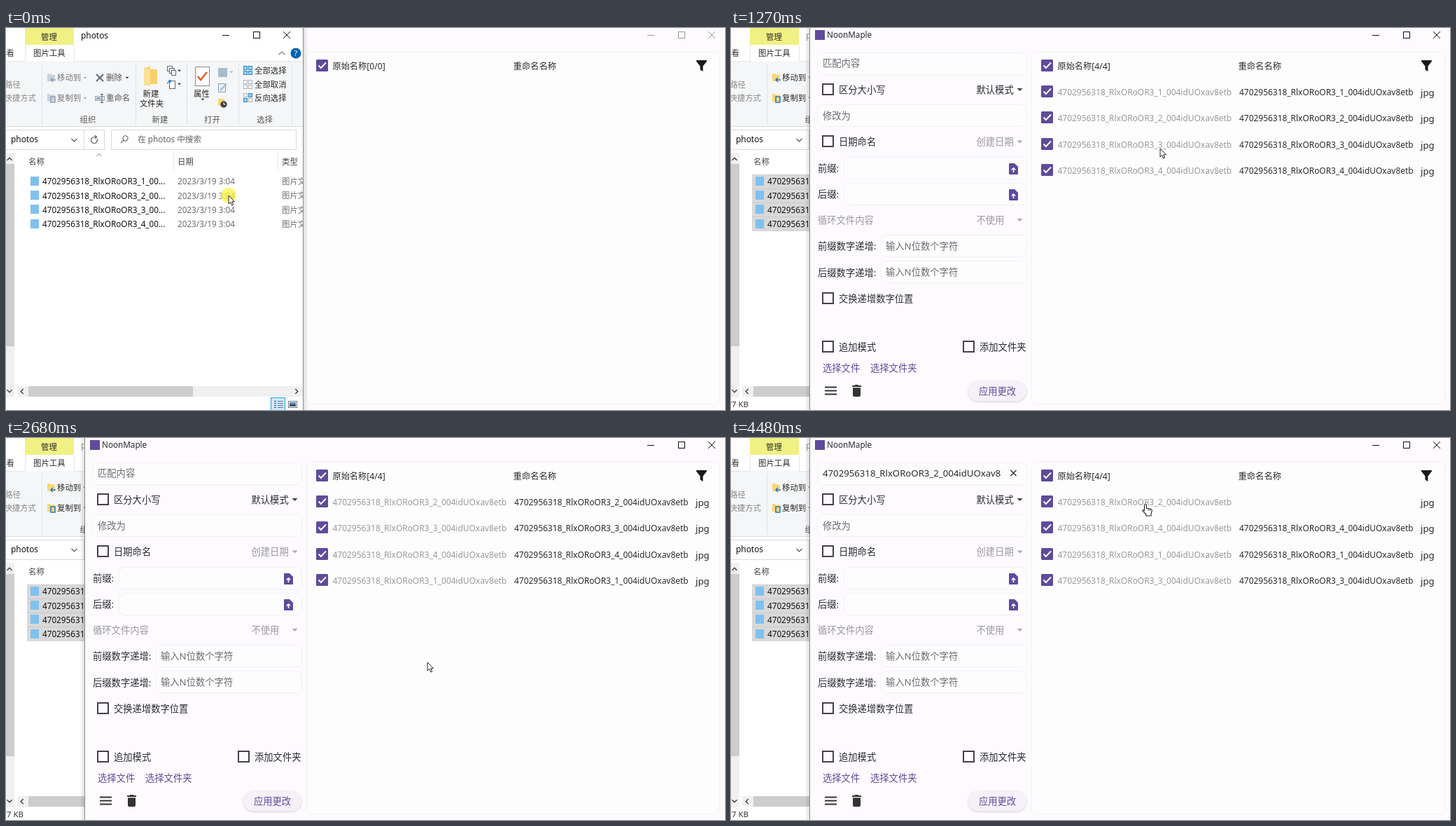
An HTML page with a canvas that plays this animation: 1027x545 px, repeating every 5.22 s.

```html
<!DOCTYPE html>
<html lang="zh-CN">
<head>
<meta charset="utf-8">
<title>Batch rename</title>
<style>
html, body { margin: 0; width: 100%; height: 100%; overflow: hidden; background: #fff; }
canvas { display: block; }
</style>
</head>
<body>
<canvas id="stage" width="1027" height="545"></canvas>
<script>
const ctx = document.getElementById('stage').getContext('2d');
const LOOP = 5220, STEP = 66.92;
const FONT = '"Noto Sans", "Noto Sans CJK SC", sans-serif';
const PURPLE = '#5f4b9b', INK = '#2a292d', EXPLORER_W = 424, APP_X = 112;
const fileName = n => `4702956318_RlxORoOR3_${n}_004idUOxav8etb`;

// ---- drawing helpers ----
function text(str, x, y, size = 11.4, color = '#2a2a2a', align = 'left') {
  ctx.font = `${size}px ${FONT}`;
  ctx.fillStyle = color;
  ctx.textAlign = align;
  ctx.fillText(str, x, Math.round(y + size * 0.37));
}
function rect(x, y, w, h, fill, stroke) {
  if (fill) { ctx.fillStyle = fill; ctx.fillRect(x, y, w, h); }
  if (stroke) { ctx.strokeStyle = stroke; ctx.lineWidth = 1; ctx.strokeRect(x + .5, y + .5, w - 1, h - 1); }
}
function round(x, y, w, h, r, fill, stroke) {
  ctx.beginPath();
  ctx.roundRect(x, y, w, h, r);
  if (fill) { ctx.fillStyle = fill; ctx.fill(); }
  if (stroke) { ctx.strokeStyle = stroke; ctx.lineWidth = 1; ctx.stroke(); }
}
function circle(x, y, r, fill) {
  ctx.beginPath();
  ctx.arc(x, y, r, 0, 7);
  ctx.fillStyle = fill;
  ctx.fill();
}
function path(d, x, y, fill, stroke, width = 1) {
  const p = new Path2D(d);
  ctx.save();
  ctx.translate(x, y);
  if (fill) { ctx.fillStyle = fill; ctx.fill(p); }
  if (stroke) { ctx.strokeStyle = stroke; ctx.lineWidth = width; ctx.stroke(p); }
  ctx.restore();
}
const dropArrow = (x, y, color = '#333', s = 2.5) => path(`M${-s} ${-s / 2}H${s}L0 ${s / 2}Z`, x, y, color);
function chevron(x, y, s, dir, color, width = 1.2) {
  const h = 'v>'.includes(dir) ? s / 2 : -s / 2;
  const d = 'v^'.includes(dir) ? `M${-s} ${-h}L0 ${h}L${s} ${-h}` : `M${-h} ${-s}L${h} 0L${-h} ${s}`;
  path(d, x, y, null, color, width);
}
function windowButtons(x, gap, color) {
  path('M-5 .5H5', x, 10, null, color);
  rect(Math.round(x + gap - 5), 5, 10, 10, null, color);
  path('M-5-5L5 5M5-5L-5 5', x + 2 * gap, 10, null, color);
}

// ---- timing ----
const clamp = v => Math.max(0, Math.min(1, v));
const smooth = v => { v = clamp(v); return v * v * (3 - 2 * v); };
const easeOut = v => 1 - (1 - clamp(v)) ** 3;
const mix = (a, b, k) => a + (b - a) * k;
const within = (t, a, b) => t >= a && t < b;

// Pointer tip: time, x, y
const POINTER = [
  [0, 318, 239], [540, 330, 240], [800, 627, 204], [1070, 627, 204], [1600, 591, 121],
  [1800, 590, 114], [1930, 590, 99], [2020, 590, 102], [2075, 590, 130], [2140, 590, 224],
  [2275, 590, 332], [2370, 591, 356], [2440, 592, 354], [2670, 602, 324], [3010, 610, 141],
  [3110, 610, 142], [3210, 610, 215], [3280, 610, 243], [3560, 610, 242], [3950, 591, 94]
];
function pointer(t) {
  const i = POINTER.findIndex(p => p[0] > t);
  if (i < 0) return POINTER.at(-1).slice(1);
  const [a, b] = [POINTER[i - 1], POINTER[i]], k = (t - a[0]) / (b[0] - a[0]);
  return [mix(a[1], b[1], k), mix(a[2], b[2], k)];
}
const pressed = t => t < 140 || within(t, 460, 1060) || within(t, 1990, 2400) ||
  within(t, 3060, 3300) || within(t, 4080, 4280);

const PITCH = 37.3;
const slot = i => 91 + PITCH * i;
const settle = (t, start) => smooth((t - start) / 250);
function dragged(t, from, to, offset, grab, drop) {
  if (t < grab) return slot(from);
  const y = Math.max(slot(from), pointer(Math.min(t, drop))[1] - offset);
  return t < drop ? y : mix(y, slot(to), easeOut((t - drop) / 200));
}
function rowY(n, t) {
  switch (n) {
    case 1: return dragged(t, 0, 3, 8, 1990, 2400) - PITCH * settle(t, 3214);
    case 2: return slot(1) - PITCH * settle(t, 2060);
    case 3: return t < 3060 ? slot(2) - PITCH * settle(t, 2095) : dragged(t, 1, 3, 12, 3060, 3300);
    default: return slot(3) - PITCH * (settle(t, 2131) + settle(t, 3181));
  }
}

// ---- file manager ----
function folder(x, y, mark, on) {
  path('M0 1H4L5 2.5H11V12H0Z', x, y, on ? '#f8d775' : '#c9d3dc');
  path(mark, x, y, null, on ? '#2878c8' : '#8fa4b8', 1.6);
}
function ribbon(on) {
  const label = on ? '#2a2a2a' : '#777', arrow = on ? '#333' : '#aaa';
  rect(0, 48, EXPLORER_W, 93, '#f5f6f7');
  rect(0, 47, EXPLORER_W, 1, '#e4e5e6');
  rect(0, 140, EXPLORER_W, 1, '#dadbdc');
  rect(27, 0, 70, 24, '#f0f083');
  rect(27, 24, 1, 24, '#e8e8e0');
  rect(97, 24, 1, 24, '#e8e8e0');
  rect(28, 47, 69, 1, '#f9f9f9');
  text('管理', 50, 13);
  text('图片工具', 39, 36);
  text('查看', 12, 36, 11.4, '#333', 'right');
  chevron(394, 36, 4.5, '^', '#888');
  circle(414, 36, 7.5, '#0063b1');
  text('?', 414, 36, 11, '#fff', 'center');
  text('复制路径', 21, 81, 11.4, '#888', 'right');
  text('粘贴快捷方式', 43, 100, 11.4, '#888', 'right');
  for (const x of [51, 185, 258, 332, 408]) rect(x, 51, 1, 87, '#e2e3e4');
  ['组织', '新建', '打开', '选择'].forEach((s, i) => text(s, [117, 220, 294.5, 369.5][i], 131, 11.4, '#555', 'center'));

  folder(59, 64, 'M12 10H6M8 7L5 10L8 13', on);
  folder(59, 93, 'M5 5H11V13H5Z', on);
  text('移动到', 73, 71, 11.4, label);
  text('复制到', 73, 100, 11.4, label);
  dropArrow(113, 71, arrow);
  dropArrow(113, 100, arrow);
  path('M-5-5L5 5M5-5L-5 5', 134, 71, null, on ? '#d32a12' : '#5c6c80', 2);
  text('删除', 143, 71, 11.4, on ? '#222' : '#555');
  dropArrow(173, 71);
  rect(127, 97, 14, 7, on ? '#dcecfa' : '#e6eaee', on ? '#3b87c9' : '#94a5b5');
  rect(129, 99, 6, 3, on ? '#2878c8' : '#94a5b5');
  path('M-2-6H2M-2 6H2M0-6V6', 137, 100.5, null, '#555');
  text('重命名', 143, 100, 11.4, on ? '#222' : '#555');

  path('M0 2L9 0V4H19V25H9L0 27Z', 197, 55, '#f6d169');
  path('M0 2L9 4V28L0 26Z', 197, 55, '#fae195');
  text('新建', 207, 94, 11.4, '#222', 'center');
  text('文件夹', 208, 108, 11.4, '#222', 'center');
  rect(230, 54, 8, 8, '#fff', '#667');
  rect(233, 57, 8, 8, '#e7eef5', '#667');
  rect(236, 60, 7, 8, '#fff', '#667');
  dropArrow(247.5, 61);
  rect(233, 75, 9, 12, '#fff', '#667');
  path('M0 4L5 0M2 0H5V3', 230, 75, null, '#2878c8', 1.3);
  dropArrow(247.5, 80);

  rect(270, 55, 21, 28, '#fff', '#8b8b8b');
  path('M0 5L4 10L13-1', 274, 64, null, '#d9622b', 2.6);
  text('属性', 279.5, 94, 11.4, '#222', 'center');
  dropArrow(281, 102);
  rect(303, 57, 13, 13, on ? '#2a8fd6' : '#a9bccb');
  dropArrow(322, 63, arrow);
  rect(303, 79, 11, 13, on ? '#fff' : '#e9eff6', '#8ba0b8');
  path('M0 9L9 0', 306, 80, null, on ? '#e0a32c' : '#a3b8cf', 2.2);
  rect(303, 101, 9, 10, on ? '#dbe5ef' : '#f8d775');
  circle(311, 109, 4.7, on ? '#9cb8d4' : '#444');
  path('M0-3V0H2.5', 311, 109, null, '#fff');

  ['全部选择', '全部取消', '反向选择'].forEach((s, i) => {
    const y = 61 + i * 19.5;
    text(s, 355, y);
    for (let k = 0; k < 4; k++) {
      const full = i === 0 || (i === 2 && (k === 1 || k === 2));
      rect(339 + (k % 2) * 7, Math.round(y) - 7 + (k >> 1) * 7, 6, 6, full ? '#9bd0f2' : '#fff', full ? '#2d86c4' : '#aab2ba');
    }
  });
}
function explorer(t, front) {
  const picked = t >= 70, all = t >= 190;
  ctx.save();
  ctx.beginPath();
  ctx.rect(0, 0, EXPLORER_W, 545);
  ctx.clip();
  rect(0, 0, EXPLORER_W, 545, '#fff');
  ribbon(picked);
  text('photos', 107, 11, 11.9, front ? '#111' : '#999');
  windowButtons(314, 43.5, '#111');

  rect(-1, 145, 113, 29, '#fff', '#d9d9d9');
  rect(111, 145, 30, 29, '#fff', '#d9d9d9');
  rect(150, 145, 265, 29, '#fff', '#d9d9d9');
  text('photos', 7, 159, 11.9, '#111');
  chevron(97.5, 160, 4, 'v', '#555');
  path('M4-2A4.5 4.5 0 1 1 0-4.5H3M1-7L3.5-4.5L1-2', 126, 160, null, '#555', 1.2);
  path('M-1 1L-5 5M-1 1A3.6 3.6 0 1 1 4 1A3.6 3.6 0 0 1-1 1', 169, 159, null, '#666', 1.1);
  text('在 photos 中搜索', 188, 159, 11.7, '#666');

  text('名称', 32, 191, 11.4, '#444');
  text('日期', 245, 191, 11.4, '#444');
  text('类型', 394, 191, 11.4, '#444');
  chevron(133, 181, 3.5, '^', '#777', 1);
  rect(239, 178, 1, 25, '#e5e5e5');
  rect(388, 178, 1, 25, '#e5e5e5');
  for (let i = 0; i < 4; i++) {
    const y = 219 + i * 20.2, top = Math.round(y - 10.5);
    if (all || (picked && i === 1)) {
      rect(30, top, 400, 21, front ? '#cce8ff' : '#d9d9d9');
      rect(30, top, 400, 1, front ? '#a9d7fb' : '#cbcbcb');
    }
    rect(35, Math.round(y) - 7, 12, 13, '#7fc1ee');
    text(fileName(i + 1).slice(0, 25) + '...', 52, y, 11.73, '#111');
    text('2023/3/19 3:04', 245, y, 11.73, '#6d6d6d');
    text('图片文件', 394, y, 11.4, '#6d6d6d');
  }

  rect(0, 178, 12, 349, '#f0f0f0');
  rect(0, 194, 12, 260, '#cdcdcd');
  chevron(5, 187, 3.5, '^', '#444', 1.5);
  chevron(5, 518, 3.5, 'v', '#444', 1.5);
  rect(16, 511, 408, 15, '#f0f0f0');
  rect(32, 511, 235, 15, '#cdcdcd');
  chevron(23, 518.5, 3.5, '<', '#444', 1.5);
  chevron(415, 518.5, 3.5, '>', '#444', 1.5);
  if (all) text(t < 600 ? '7 KB' : '77 KB', 25, 537, 11.4, '#333', 'right');
  rect(378, 527, 21, 20, '#cce8ff', '#26a0da');
  for (let y = 532; y < 544; y += 3) { rect(383, y, 3, 1, '#456'); rect(388, y, 8, 1, '#678'); }
  rect(403, 532, 13, 10, '#fff', '#777');
  rect(405, 534, 9, 4, '#4a90c4');
  rect(405, 537, 9, 3, '#456');
  ctx.restore();
}

// ---- rename tool ----
const field = (x, y, w) => round(x + .5, y + .5, w, 31, 8, '#fefdfe', '#f4f0f6');
function checkbox(x, y, checked) {
  if (checked) {
    round(x - 8.5, y - 8.5, 17, 17, 1.5, PURPLE);
    path('M-5 0L-1.7 3.5L5.5-4', x, y, null, '#fff', 1.9);
  } else {
    ctx.strokeStyle = '#45414b';
    ctx.lineWidth = 2;
    ctx.strokeRect(x - 7.5, y - 7.5, 15, 15);
  }
}
function option(x, y, label) {
  checkbox(x, y, false);
  text(label, x + 15.5, y + .8, 13.3, INK);
}
function uploadIcon(x, y) {
  path('M0 1Q0 0 1 0H8L13 5V15Q13 16 12 16H1Q0 16 0 15Z', x, y, PURPLE);
  path('M6.5 13V8M3.8 9.5L6.5 6.8L9.2 9.5', x, y, null, '#fff', 1.6);
}
function settings(t) {
  const hint = '#6c6870', faint = '#9b979e';
  rect(120, 3, 14, 14, PURPLE);
  text('NoonMaple', 137, 10, 11.7, INK);
  field(123, 35, 299);
  if (t >= 4280) {
    text(fileName(2).slice(0, 34), 131, 50, 13.2, INK);
    path('M-4-4L4 4M4-4L-4 4', 403.5, 50, null, '#333', 1.5);
  } else text('匹配内容', 131, 50, 13.3, hint);
  option(138.5, 87.5, '区分大小写');
  text('默认模式', 350.5, 88, 13.3, INK);
  dropArrow(412.5, 88, '#444', 4);
  field(123, 109, 299);
  text('修改为', 131, 125, 13.3, hint);
  option(138.5, 161.5, '日期命名');
  text('创建日期', 350.5, 162.5, 13.3, faint);
  dropArrow(412.5, 162.5, '#aaa', 4);
  ['前缀:', '后缀:'].forEach((s, i) => {
    const y = 200 + PITCH * i;
    text(s, 124, y, 13.3, INK);
    field(161, Math.round(y) - 16, 261);
    uploadIcon(397, Math.round(y) - 7);
  });
  text('循环文件内容', 124, 274.5, 13.3, faint);
  text('不使用', 350.5, 274.5, 13.3, faint);
  dropArrow(412.5, 274, '#aaa', 4);
  ['前缀数字递增:', '后缀数字递增:'].forEach((s, i) => {
    const y = 311.5 + PITCH * i;
    text(s, 124, y, 13.3, INK);
    field(214, Math.round(y) - 17, 208);
    text('输入N位数个字符', 221, y - .5, 13.3, hint);
  });
  option(138.5, 385.5, '交换递增数字位置');
  option(138.5, 454.5, '追加模式');
  option(339.5, 454.5, '添加文件夹');
  text('选择文件', 131, 485, 13.3, PURPLE);
  text('选择文件夹', 199, 485, 13.3, PURPLE);
  path('M0 0H17M0 5H17M0 10H17', 134, 512.5, null, '#333', 1.8);
  path('M0 1H3.5L4.5 0H8.5L9.5 1H13V3H0ZM1 4.2H12V15Q12 17 10 17H3Q1 17 1 15Z', 173, 509, '#333');
  ctx.save();
  ctx.shadowColor = 'rgba(0,0,0,.18)';
  ctx.shadowBlur = 3;
  ctx.shadowOffsetY = 1;
  round(339, 503.5, 83, 29, 14.5, '#f6f1f9');
  ctx.restore();
  text('应用更改', 380.5, 518.5, 13.3, PURPLE, 'center');
}
function fileRow(n, t) {
  const y = Math.round(rowY(n, t));
  const held = n === 1 ? within(t, 1990, 2600) : n === 3 && within(t, 3060, 3500);
  if (held) {
    rect(429, y - 18, 591, 37, '#fdfbfe');
    if (pressed(t)) rect(429, y + 18, 591, 1, '#dedbe1');
  }
  checkbox(451.5, y - .5, true);
  text(fileName(n), 466.5, y + 1, 11.95, '#9a989c');
  if (n !== 2 || t < 4280) text(fileName(n), 726, y + 1, 11.95, INK);
  text('jpg', 985, y + 1, 13.3, INK);
}
function app(t, front) {
  const loaded = t >= 1000;
  rect(APP_X, 0, 1027 - APP_X, 545, '#fdfbfe');
  windowButtons(921, 43.5, front ? '#111' : '#999');
  settings(t);
  round(429.5, 34.5, 590, 502, 8, '#fefdfe', '#f4f1f6');
  checkbox(451.5, 53.5, true);
  text(`原始名称[${loaded ? '4/4' : '0/0'}]`, 466.5, 54.5, 12.2, INK);
  text('重命名名称', 724.5, 54, 12.3, INK);
  path('M0 0H15V1.5L9.5 8.5V16L5.5 13.5V8.5L0 1.5Z', 986, 46, '#1a1a1a');
  if (loaded) {
    const order = t < 2800 ? [2, 3, 4, 1] : [2, 4, 1, 3];
    order.forEach(n => fileRow(n, t));
  }
}

// Soft shadow beside a window edge; dir is the side it falls on
function edgeShadow(x, dir) {
  rect(x, 0, 1, 545, '#8f8f8f');
  for (let i = 1; i < 7; i++) rect(x + dir * i, 0, 1, 545, `rgba(0,0,0,${0.13 * (1 - i / 7)})`);
}

function drawPointer(t) {
  const [x, y] = pointer(t).map(Math.round);
  if (pressed(t)) circle(x, y, 11, 'rgba(255,244,60,.72)');
  const hand = within(t, 1300, 2450) || t >= 2950;
  if (hand) {
    path('M0 1.5Q1.5-1 3 1.5V6L9 7.2Q11 8 10.8 10L9.5 14V17H2.5V15L-2.5 10Q-2.5 8-.8 8.5L0 9.5Z', x - .5, y, '#fff', '#222', 1.1);
    path('M5.5 7V9.5M8 7.5V9.8', x - .5, y, null, '#222', .9);
  } else {
    path('M0 0V12L2.8 9.5L4.8 14L6.7 13.1L4.8 8.8H8.5Z', x, y, '#fff', '#222', 1);
  }
  if (within(t, 600, 1000)) {
    rect(x + 6, y + 13, 10, 10, '#fff', '#111');
    path('M0 5L5 0M1.5 0H5V3.5', x + 8.5, y + 15.5, null, '#111', 1.3);
  }
}

function draw(t) {
  const front = t >= 1190;
  if (front) {
    explorer(t, false);
    app(t, true);
    edgeShadow(APP_X, -1);
  } else {
    app(t, false);
    explorer(t, true);
    edgeShadow(EXPLORER_W, 1);
  }
  drawPointer(t);
}

// The picture advances about fifteen times per second
function tick() {
  const t = performance.now() % LOOP;
  draw(Math.floor((t + 8) / STEP) * STEP);
  requestAnimationFrame(tick);
}
tick();
</script>
</body>
</html>
```
